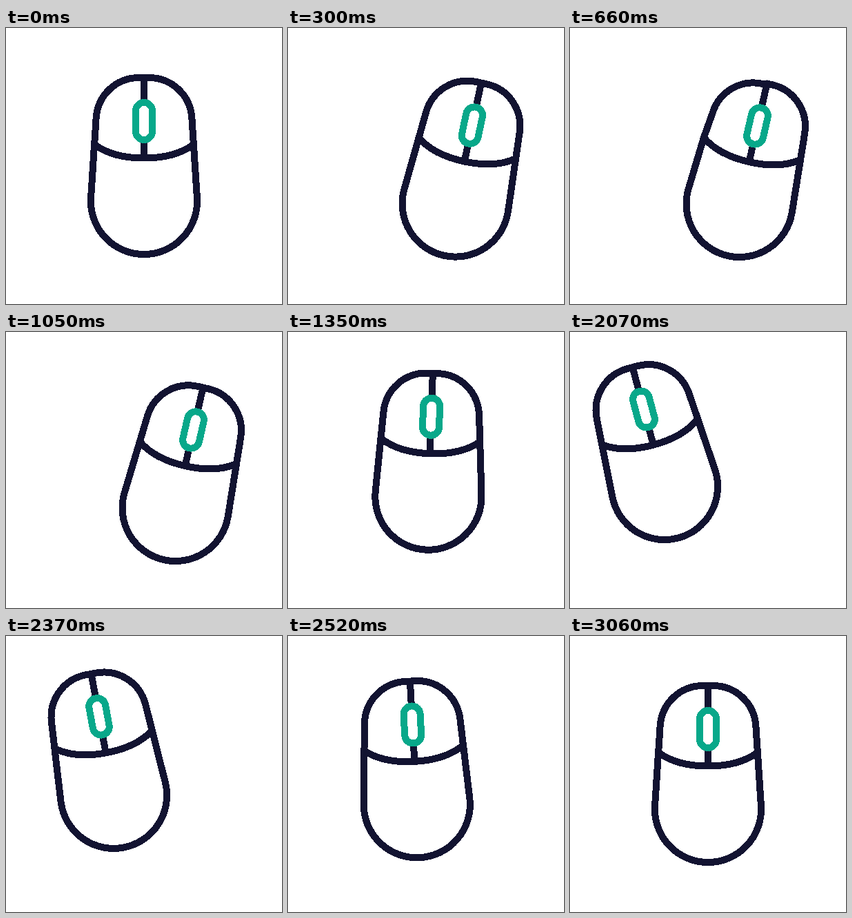
An HTML page for the animation above (5.09 s loop, 400 by 400 pixels).

```html
<!DOCTYPE html>
<html lang="en">
<head>
<meta charset="utf-8">
<title>Computer mouse</title>
<style>
  html, body { margin: 0; width: 100%; height: 100%; overflow: hidden; background: #fff; }
  svg { display: block; width: 100%; height: 100%; shape-rendering: crispEdges; }
</style>
</head>
<body>
<svg viewBox="0 0 400 400" fill="none" stroke="#121331" stroke-width="10" stroke-linejoin="round">
  <g id="mouse">
    <path d="M198 72H207C241 72 267.4 98 269.4 131L277 247A77.1 77.1 0 1 1 123 247L128.2 167"/>
    <path id="button"/>
    <path d="M128.5 169C146 182 172 188.5 200 188.5S254 182 271.5 169M200 72V188"/>
    <rect x="188" y="108" width="24" height="54" rx="12" fill="#fff" stroke="#08a88a"/>
  </g>
</svg>
<script>
const LOOP = 5090, STEP = 30;
const mouse = document.getElementById('mouse');
const button = document.getElementById('button');

const REST = { x: 200, y: 200, angle: 0 };
const RIGHT = { x: 257, y: 205.3, angle: 12.9 };
const LEFT = { x: 123.8, y: 174.8, angle: -15 };

// lift bends the path upwards between its two ends
const moves = [
  { start: 0, end: 490, from: REST, to: RIGHT, lift: 1, ease: [0.15, 0] },
  { start: 1140, end: 1740, from: RIGHT, to: LEFT, lift: 6, ease: [0.33, 0.43] },
  { start: 2220, end: 2760, from: LEFT, to: REST, lift: 2, ease: [0.33, 0.33] }
];
const clicks = [[570, 1050], [1740, 2070], [2760, 3060]];

const mix = (a, b, p) => a + (b - a) * p;

// Bezier easing with control points (x1, 0) and (x2, 1)
function bezierEase(t, [x1, x2]) {
  let low = 0, high = 1;
  for (let i = 0; i < 24; i++) {
    const s = (low + high) / 2, r = 1 - s;
    if (3 * r * r * s * x1 + 3 * r * s * s * x2 + s ** 3 < t) low = s; else high = s;
  }
  return low * low * (3 - 2 * low);
}

function poseAt(time) {
  const { start, end, from, to, lift, ease } = moves.findLast(m => time >= m.start);
  if (time >= end) return to;
  const p = time > start ? bezierEase((time - start) / (end - start), ease) : 0;
  return {
    x: mix(from.x, to.x, p),
    y: mix(from.y, to.y, p) - lift * 4 * p * (1 - p),
    angle: mix(from.angle, to.angle, p)
  };
}

function pressAt(time) {
  const click = clicks.find(([start, end]) => time > start && time < end);
  return click ? Math.sin(Math.PI * (time - click[0]) / (click[1] - click[0])) ** 2 : 0;
}

function draw(time) {
  const { x, y, angle } = poseAt(time);
  const d = 6 * pressAt(time);
  mouse.setAttribute('transform', `translate(${x} ${y}) rotate(${angle}) translate(-200 -200)`);
  button.setAttribute('d', `M128.2 168L${130.6 + d} ${131 + d / 2}` +
    `C${132.6 + d} ${98 + d} ${159 + d} ${72 + d} ${193 + d / 2} ${72 + d}L201 72`);
}

const begin = performance.now();
function tick() {
  const time = (performance.now() - begin) % LOOP;
  draw(Math.floor(time / STEP) * STEP);
  requestAnimationFrame(tick);
}
tick();
</script>
</body>
</html>
```
